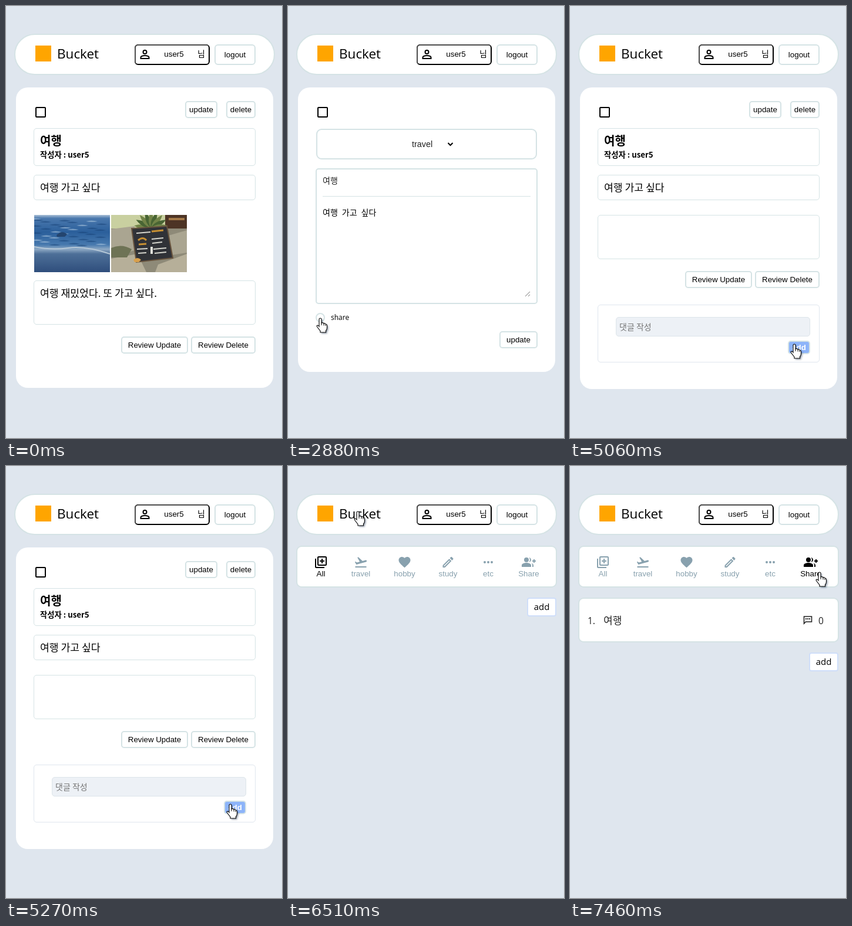
An HTML page with a canvas for the animation above (8 s loop, 470 by 732 pixels).

```html
<!DOCTYPE html>
<html lang="ko">
<head>
<meta charset="utf-8">
<title>Bucket</title>
<style>
html, body { margin: 0; height: 100%; overflow: hidden; background: #dfe6ee; }
canvas { display: block; width: 470px; height: 732px; }
</style>
</head>
<body>
<canvas id="stage"></canvas>
<script>
const W = 470, H = 732, LOOP = 8000;
const canvas = document.getElementById('stage');
const ctx = canvas.getContext('2d');
const ratio = Math.max(1, window.devicePixelRatio || 1);
canvas.width = W * ratio;
canvas.height = H * ratio;

const ARIAL = '"Liberation Sans", sans-serif';
const SANS = '"Open Sans", "Noto Sans CJK KR", sans-serif';
const KOREAN = '"Noto Sans CJK KR", "Noto Sans CJK", sans-serif';
const MONO = '"Noto Sans Mono CJK KR", "Noto Sans CJK KR", monospace';
const BORDER = '#d5e3e5', BLUE = '#8db4f9', MUTED = '#88a1ae', USER = 'user5';

// Pointer moves: start, end, then from, control and to points
const MOVES = [
  [690, 1230, [386, -25], [378, 90], [343, 179]],
  [1470, 1550, [343, 179], [343, 178], [344, 176]],
  [1980, 2740, [344, 176], [200, 300], [54, 538]],
  [2810, 2880, [54, 538], [54, 534], [55, 530]],
  [3210, 3840, [55, 530], [270, 628], [381, 582]],
  [4110, 4180, [381, 582], [381, 578], [382, 574]],
  [5870, 6370, [382, 574], [230, 260], [119, 78]],
  [6700, 7330, [119, 78], [520, 230], [425, 181]]
];

const ICONS = {
  All: 'M4 6H2v14c0 1.1.9 2 2 2h14v-2H4zM20 2H8c-1.1 0-2 .9-2 2v12c0 1.1.9 2 2 2h12c1.1 0 2-.9 2-2V4c0-1.1-.9-2-2-2zm0 14H8V4h12zm-7-2h2v-3h3V9h-3V6h-2v3h-3v2h3z',
  travel: 'M2.5 19h19v2h-19zM22 9.6c-.2-.8-1-1.3-1.8-1L14.9 10 8 3.6l-1.9.5 4.1 7.2-5 1.3-1.9-1.6-1.5.4 2.6 4.5L21 11.5c.8-.2 1.3-1 1-1.9z',
  hobby: 'M12 21.3C5.4 15.4 2 12.3 2 8.5 2 5.4 4.4 3 7.5 3c1.7 0 3.4.8 4.5 2.1C13.1 3.8 14.8 3 16.5 3 19.6 3 22 5.4 22 8.5c0 3.8-3.4 6.9-10 12.8z',
  study: 'M14.1 9l.9.9L5.9 19H5v-.9zM17 3.3l-1.9 1.8 3.8 3.8L20.7 7c.4-.4.4-1 0-1.4l-2.3-2.3c-.4-.4-1-.4-1.4 0zM14.1 6.2L3 17.3V21h3.8L17.8 9.9z',
  etc: 'M4 12a2 2 0 1 0 4 0a2 2 0 1 0-4 0zm6 0a2 2 0 1 0 4 0a2 2 0 1 0-4 0zm6 0a2 2 0 1 0 4 0a2 2 0 1 0-4 0z',
  Share: 'M22 9V7h-2v2h-2v2h2v2h2v-2h2V9zM4 8a4 4 0 1 0 8 0a4 4 0 1 0-8 0zM8 13c-2.7 0-8 1.3-8 4v3h16v-3c0-2.7-5.3-4-8-4zM12.5 4c2 2 2 6 0 8c4.6-.6 4.6-7.400 0-8zM16.500 13.800c1 .9 1.500 2 1.500 3.200v3h2v-3c0-1.500-1.600-2.500-3.500-3.200z'
};
const TABS = { All: 56, travel: 124, hobby: 198.500, study: 272.500, etc: 341, Share: 410 };
const ARROW = 'M0 0V16L4 12.500L6.500 18.500L9 17.500L6.500 11.500H11.500Z';
const HAND = 'M-2 1Q-2-1 0-1T2 1V7Q5 6 6 8Q8 7 9 9Q11.500 9 11.500 12V15Q11.500 18 9.500 20V23H0V20.500Q-2 18-5.500 13.500Q-6.500 11.500-5 11Q-3.500 11-2 13Z';
const KNUCKLES = 'M2 7V11M6 8V11.500M9 9.500V12';

let pointer = null, overLink = false;

function path(d, x, y, fill, stroke, line = 1) {
  const p = new Path2D(d);
  ctx.save();
  ctx.translate(x, y);
  if (fill) { ctx.fillStyle = fill; ctx.fill(p, 'evenodd'); }
  if (stroke) {
    ctx.shadowColor = 'transparent';
    ctx.strokeStyle = stroke; ctx.lineWidth = line; ctx.stroke(p);
  }
  ctx.restore();
}

function box(x, y, w, h, radius, line = 0, stroke = BORDER, fill = '#fff') {
  ctx.beginPath();
  ctx.roundRect(x + line / 2, y + line / 2, w - line, h - line, radius - line / 2);
  ctx.fillStyle = fill;
  ctx.fill();
  if (line) { ctx.strokeStyle = stroke; ctx.lineWidth = line; ctx.stroke(); }
}

function rect(x, y, w, h, color) {
  ctx.fillStyle = color;
  ctx.fillRect(x, y, w, h);
}

function text(s, x, y, size, family = KOREAN, { color = '#000', weight = 400, align = 'left' } = {}) {
  ctx.font = `${weight} ${size}px ${family}`;
  ctx.fillStyle = color;
  ctx.textAlign = align;
  ctx.fillText(s, x, y);
}

function link(x, y, w, h) {
  const hit = pointer && pointer.x >= x && pointer.x < x + w && pointer.y >= y && pointer.y < y + h;
  if (hit) overLink = true;
  return hit;
}

function button(label, x, y, w, h = 29) {
  const hot = link(x, y, w, h);
  box(x, y, w, h, 5, 2, BORDER, hot ? BLUE : '#fff');
  text(label, x + w / 2, y + h / 2 + 4.500, 13.333, ARIAL,
    { align: 'center', color: hot ? '#fff' : '#000', weight: hot ? 700 : 400 });
}

function header() {
  box(14, 47, 444, 70, 35, 2);
  rect(50, 67, 27, 27, '#ffa500');
  text('Bucket', 87, 89, 22.500, SANS);
  link(50, 62, 109, 36);

  box(219, 65, 128, 35, 6, 2, '#000');
  ctx.save();
  ctx.clip(new Path2D('M219 65H347L330 82H236L219 100Z'));
  box(219, 65, 128, 35, 6, 2, '#4c4c4c');
  ctx.restore();
  path('M9 8a3 3 0 1 0 6 0a3 3 0 1 0-6 0zM5 19v-2c0-2 4-3 7-3s7 1 7 3v2z', 224.500, 70, null, '#000', 2);
  text(USER, 286, 86, 13.333, ARIAL, { align: 'center' });
  text('님', 326, 86, 14);
  box(355, 65, 70, 35, 6, 2);
  text('logout', 390, 87, 13.333, ARIAL, { align: 'center' });
}

function checkbox() {
  box(50, 171, 18, 18, 2, 2, '#000');
}

function framed(x, y, draw) {
  ctx.save();
  ctx.translate(x, y);
  ctx.beginPath();
  ctx.rect(0, 0, 129, 97);
  ctx.clip();
  draw();
  ctx.restore();
}

function seaPhoto() {
  const g = ctx.createLinearGradient(0, 0, 0, 97);
  [[0, '#a9bfd6'], [.06, '#4a78ad'], [.3, '#2b5f9b'], [.52, '#4779ae'], [.6, '#8ea9c4'],
    [.68, '#4d6f98'], [1, '#2f4e7c']].forEach(([at, color]) => g.addColorStop(at, color));
  rect(0, 0, 129, 97, g);
  for (let i = 0; i < 34; i++) {
    const x = (i * 47) % 125 - 8, y = 7 + (i * 13) % 46;
    path('M0 0q9-3 20 0q-9 2-20 0z', x, y, i % 3 ? 'rgba(22,63,116,.5)' : 'rgba(170,196,222,.6)');
  }
  path('M38 34q10-9 18-1l-4 4h-13z', 0, 0, '#24456f');
  path('M0 54q30 6 58 2t71 10', 0, 0, null, '#b6c8d8', 2);
}

function boardPhoto() {
  rect(0, 0, 129, 97, '#8e8a78');
  rect(0, 0, 129, 23, '#c9d0a0');
  rect(92, 0, 37, 23, '#4d3425');
  rect(98, 5, 27, 4, '#a37848');
  path('M0 24L40 19V60L0 72zM80 40L129 26V64L90 70z', 0, 0, '#aaa591');
  path('M0 74L45 66L60 97H0zM80 84L129 66V97H75z', 0, 0, '#b6af99');
  path('M0 56q18-8 35 2l-8 14H0z', 0, 0, '#6e7355');
  for (let i = 0; i < 9; i++) {
    ctx.save();
    ctx.translate(68, 22);
    ctx.rotate((i - 4) * .36);
    path('M0 0Q-8-12 0-29Q8-12 0 0z', 0, 0, i % 2 ? '#496534' : '#728448');
    ctx.restore();
  }
  path('M35 23L95 19L105 73L43 80z', 0, 0, '#303237', '#68543e', 2);
  path('M43 31l24-2M44 58l18-1M46 65l14-1M69 41l20-2M70 48l17-2M72 58l22-2M74 65l20-2', 0, 0, null, '#d5d5cd', 2);
  path('M69 28l20-2M46 43q8-7 14 0M47 50l13-1', 0, 0, null, '#c68f32', 3);
  rect(67, 54, 4, 12, '#e0e0da');
  path('M38 76q7-6 13 0l-4 4h-7z', 0, 0, '#d8a04d');
}

function detail(loaded, shared) {
  const dy = loaded ? 111 : 0;
  box(17, 138, 438, shared ? 511 + dy : 509, 20);
  checkbox();
  button('update', 305, 161, 55);
  button('delete', 375, 161, 50);
  box(47, 207, 378, 64, 5, 1);
  text('여행', 58, 236, 20, KOREAN, { weight: 700 });
  text('작성자 : ' + USER, 58, 257, 13.333, '"Noto Sans CJK KR", "Open Sans", sans-serif', { weight: 700 });
  box(47, 286, 378, 43, 5, 1);
  text('여행 가고 싶다', 58, 314, 17.200);
  if (loaded) {
    framed(48, 354, seaPhoto);
    framed(179, 354, boardPhoto);
  }
  box(47, 354 + dy, 378, 75, 5, 1);
  if (loaded) text('여행 재밌었다. 또 가고 싶다.', 58, 493, 17.200);
  button('Review Update', 196, 449 + dy, 114);
  button('Review Delete', 315, 449 + dy, 110);
  if (shared) {
    box(47, 506 + dy, 378, 98, 5, 1, '#dfe6ee');
    box(78, 527 + dy, 331, 33, 5, 1, '#dde4ea', '#edf1f6');
    text('댓글 작성', 84, 549 + dy, 14, KOREAN, { color: '#757575' });
    button('add', 371, 567 + dy, 38, 23);
  }
}

function edit(checked) {
  box(17, 138, 438, 482, 20);
  checkbox();
  box(48, 208, 376, 52, 9, 2);
  text('travel', 211, 239, 14.400, ARIAL, { color: '#222' });
  path('M0 0l4 4l4-4', 272.500, 232, null, '#000', 2);
  box(47, 275, 378, 230, 5, 2);
  text('여행', 59, 301, 14, MONO, { color: '#222' });
  rect(59, 322, 354, 1, BORDER);
  text('여행 가고 싶다', 59, 355, 14, MONO);
  path('M0 8l8-8M5 8l3-3', 404, 484, null, '#777');
  box(47, 520, 16, 16, 8, 2, BORDER, checked ? BORDER : '#fff');
  link(47, 520, 16, 16);
  text('share', 73, 532, 12, SANS);
  button('update', 360, 551, 65);
}

function home(active, listed) {
  box(14, 135, 444, 71, 9, 2);
  for (const [name, x] of Object.entries(TABS)) {
    const color = name === active ? '#000' : MUTED;
    path(ICONS[name], x - 12, 151, color);
    text(name, x, 187, 13.333, ARIAL, { color, align: 'center' });
    link(x - 20, 150, 40, 42);
  }
  if (listed) {
    box(14, 223, 444, 76, 9, 2);
    text('1.', 30, 268, 15.500, SANS, { color: '#222' });
    text('여행', 57, 268, 17, KOREAN, { color: '#222' });
    path('M0 13V1H13V10H3z', 398.500, 254, null, '#222', 1.600);
    for (const x of [401, 404, 407]) rect(x, 258, 2, 2, '#222');
    text('0', 423, 268, 15.500, SANS, { color: '#222' });
  }
  const y = listed ? 316 : 223;
  box(407, y, 50, 32, 4, 2, '#cfdef9');
  text('add', 432, y + 21, 15, SANS, { align: 'center' });
}

function scrollbar() {
  rect(455, 0, 15, H, '#f1f1f1');
  rect(457, 15, 11, 640, '#c1c1c1');
  path('M0 4l4-4l4 4z', 458.500, 5, '#505050');
  path('M0 0l4 4l4-4z', 458.500, 723, '#a3a3a3');
}

function pointerAt(t) {
  const move = MOVES.filter(m => t >= m[0]).pop();
  if (!move) return null;
  const [start, end, a, b, c] = move;
  const k = Math.min(1, (t - start) / (end - start));
  const u = k * k * (3 - 2 * k), v = 1 - u;
  const at = i => v * v * a[i] + 2 * u * v * b[i] + u * u * c[i];
  return { x: at(0), y: at(1) };
}

function drawPointer({ x, y }) {
  ctx.save();
  ctx.shadowColor = 'rgba(30,50,80,.5)';
  ctx.shadowBlur = 3 * ratio;
  ctx.shadowOffsetX = ctx.shadowOffsetY = 2 * ratio;
  path(overLink ? HAND : ARROW, x, y, '#fff', '#000', 1.100);
  ctx.restore();
  if (overLink) path(KNUCKLES, x, y, null, '#000');
}

function draw(t) {
  const tip = pointerAt(t);
  const scrolls = t >= 5340 && t < 6510;
  const shift = scrolls ? -7.500 : 0;
  pointer = tip && { x: tip.x - shift, y: tip.y };
  overLink = false;

  ctx.setTransform(ratio, 0, 0, ratio, 0, 0);
  rect(0, 0, W, H, '#dfe6ee');
  ctx.save();
  ctx.translate(shift, 0);
  header();
  if (t < 1470) detail(true, false);
  else if (t < 4920) edit(t >= 3210);
  else if (t < 6510) detail(t >= 5340, true);
  else home(t < 7390 ? 'All' : 'Share', t >= 7460 || (t >= 6570 && t < 7390));
  ctx.restore();
  if (scrolls) scrollbar();
  if (tip) drawPointer(tip);
}

const began = performance.now();
function tick() {
  draw((performance.now() - began) % LOOP);
  requestAnimationFrame(tick);
}
tick();
</script>
</body>
</html>
```
